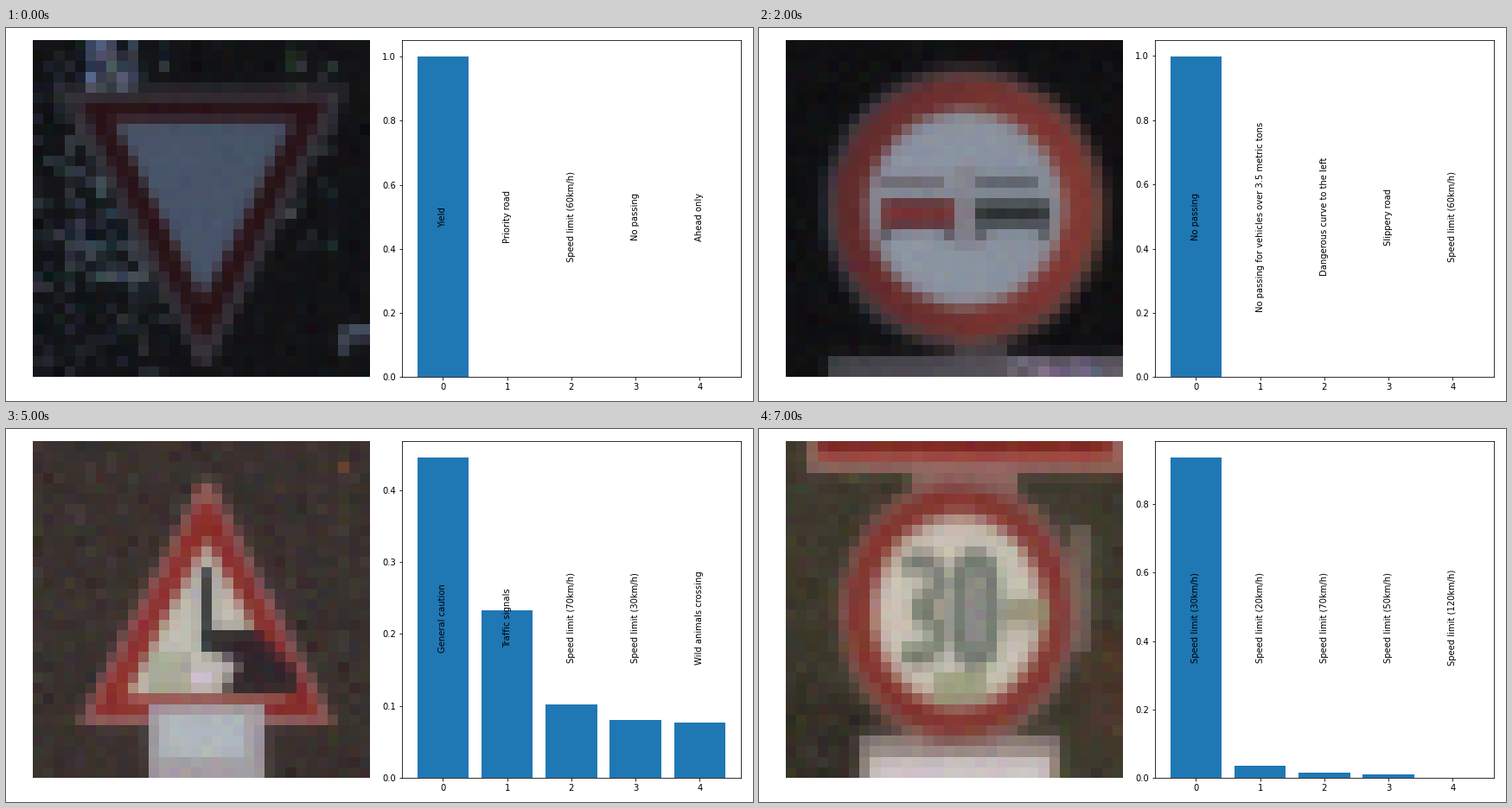
A matplotlib script for the animation above (8000 ms loop, 864x432 px).

```python
import numpy as np
import matplotlib.pyplot as plt
from matplotlib.animation import FuncAnimation
from matplotlib.colors import to_rgb
from matplotlib.path import Path

W, H, DPI = 864, 432, 72
CELLS, SUB = 32, 4
plt.rcParams.update({"font.family": "DejaVu Sans", "font.size": 10})

axis_pts = (np.arange(CELLS * SUB) + 0.5) / SUB
X, Y = np.meshgrid(axis_pts, axis_pts)
GRID = np.column_stack([X.ravel(), Y.ravel()])


def rgb(color):
    return 255 * np.array(to_rgb(color))


def oval_mask(cx, cy, rx, ry):
    return ((X - cx) / rx) ** 2 + ((Y - cy) / ry) ** 2 < 1


def poly_mask(pts):
    return Path(pts).contains_points(GRID).reshape(X.shape)


class Photo:
    """A 32 x 32 picture, painted in cell units, then averaged and softened."""

    def __init__(self, seed, bg, grain=6):
        self.rng = np.random.default_rng(seed)
        self.px = np.zeros(X.shape + (3,))
        self.fill(True, bg)
        self.speckle(0, 0, CELLS, CELLS, bg, 0.6, grain)

    def fill(self, mask, color, to=None):
        """Fill a mask; with `to`, fade the colour from left to right."""
        tone = rgb(color)
        if to:
            tone = tone + (X / CELLS)[..., None] * (rgb(to) - tone)
        mask = np.broadcast_to(mask, X.shape)
        self.px = np.where(mask[..., None], tone, self.px)

    def rect(self, x, y, w, h, color, to=None):
        self.fill((X > x) & (X < x + w) & (Y > y) & (Y < y + h), color, to)

    def poly(self, pts, color, to=None):
        self.fill(poly_mask(pts), color, to)

    def ring(self, cx, cy, rx, ry, width, color, right_only=False):
        hole = oval_mask(cx, cy, rx - width, ry - width)
        mask = oval_mask(cx, cy, rx, ry) & ~hole
        if right_only:
            mask &= X > cx - 0.5
        self.fill(mask, color)

    def speckle(self, x, y, w, h, color, density=0.5, spread=20):
        """Tint random cells with a random variation of the colour."""
        for r in range(y, y + h):
            for c in range(x, x + w):
                if self.rng.random() < density:
                    shift = self.rng.normal(0, spread) + self.rng.normal(0, spread / 3, 3)
                    tone = np.clip(rgb(color) + shift, 0, 255)
                    cell = np.s_[r * SUB:(r + 1) * SUB, c * SUB:(c + 1) * SUB]
                    self.px[cell] += self.rng.uniform(0.3, 1) * (tone - self.px[cell])

    def disc_sign(self, cx, cy, rx, ry, layers):
        """Concentric ovals; each layer is (scale, left colour, right colour)."""
        for k, left, right in layers:
            self.fill(oval_mask(cx, cy, k * rx, k * ry), left, right)

    def triangle_sign(self, cx, apex, base, half, layers):
        """Nested triangles, scaled about the centre of the inscribed circle."""
        height = base - apex
        leg = np.hypot(height, half)
        cy = base - half * height / (leg + half)
        for k, left, right in layers:
            foot, top = cy + k * (base - cy), cy + k * (apex - cy)
            self.poly([(cx - 0.5 * k, top), (cx + 0.5 * k, top),
                       (cx + k * half, foot), (cx - k * half, foot)], left, right)

    def finish(self, noise=2, soft=0.1):
        cells = self.px.reshape(CELLS, SUB, CELLS, SUB, 3).mean(axis=(1, 3))
        for axis in (0, 1):
            pad = [(1, 1) if a == axis else (0, 0) for a in range(3)]
            p = np.moveaxis(np.pad(cells, pad, mode="edge"), axis, 0)
            mixed = soft * (p[:-2] + p[2:]) + (1 - 2 * soft) * p[1:-1]
            cells = np.moveaxis(mixed, 0, axis)
        cells = cells + self.rng.normal(0, noise, cells.shape)
        return np.clip(cells, 0, 255).astype(np.uint8)


def yield_sign():
    p = Photo(3, "#121315", 3)
    p.speckle(0, 0, 13, 32, "#20262e", 0.5, 12)
    p.speckle(3, 6, 8, 18, "#424e5c", 0.6, 20)
    p.speckle(5, 0, 5, 5, "#64708a", 0.9, 24)
    p.speckle(24, 0, 5, 20, "#262c30", 0.4, 16)
    p.speckle(29, 27, 3, 3, "#5c667c", 0.7, 10)
    p.triangle_sign(16.2, 31, 4.5, 13.8, [
        (1, "#36343c", "#38343c"), (0.86, "#281216", "#281216"),
        (0.64, "#483e48", "#403844"), (0.59, "#4a576b", "#465266")])
    return p.finish(1.5, 0.05)


def no_passing():
    p = Photo(5, "#101012", 2)
    p.disc_sign(17, 16, 13.7, 13.7, [
        (1, "#1e2836", "#3e2a26"), (0.95, "#463e48", "#6c4a42"),
        (0.89, "#582628", "#883a34"), (0.69, "#76626a", "#96827e"),
        (0.65, "#8e96a8", "#88909a")])
    for x, roof, dark, bright in ((9, "#6a646a", "#603236", "#7a3230"),
                                  (18, "#565c64", "#4c5256", "#262a2c")):
        p.rect(x, 13, 6, 1, roof)
        p.rect(x, 15, 7, 3, dark)
        p.rect(x, 16, 7, 1, bright)
        for wheel in (x, x + 6):
            p.rect(wheel, 18, 1, 1, "#54565a")
    p.rect(16, 12, 2, 8, "#84848e")
    p.rect(4, 30, 28, 2, "#404246", "#605c64")
    p.rect(16, 29, 5, 1, "#443f44")
    p.speckle(21, 30, 9, 2, "#847a92", 0.8, 28)
    return p.finish()


def end_no_passing():
    p = Photo(7, "#21160e", 1)
    p.rect(0, 14, 32, 18, "#141213")
    p.speckle(0, 16, 32, 16, "#181412", 0.6, 3)
    p.rect(9, 0, 8, 2, "#0f0e0e")
    p.poly([(20, 0), (25, 0), (28, 8), (26, 10)], "#0f0d0e")
    p.disc_sign(16.1, 16.2, 13.1, 13.2, [
        (1, "#121216", "#171415"), (0.92, "#272b34", "#292d37")])
    p.rect(8, 11, 8, 9, "#1b1d20")
    p.rect(18, 17, 8, 3, "#1c1f24")
    for wheel in (18, 24):
        p.rect(wheel, 20, 1, 1, "#1b1d22")
    band = poly_mask([(22, 6.5), (25.8, 10), (10.6, 25.8), (6.5, 22.5)])
    p.fill(band, "#1a1c24")
    p.fill(band & ((np.floor(X) + np.floor(Y)) % 2 == 0), "#10121c")
    p.rect(16, 29, 1, 3, "#343229")
    return p.finish(1.2, 0.05)


def caution():
    p = Photo(11, "#3a322f", 6)
    p.rect(29, 2, 1, 1, "#7a4632")
    p.triangle_sign(16.5, 3.8, 27, 12.3, [
        (1, "#966060", "#966060"), (0.88, "#922e2a", "#842626"),
        (0.65, "#a0786e", "#a0786e"), (0.59, "#ccc6ba", "#b4b4ac")])
    p.rect(16, 12, 1, 8, "#2a3034")
    p.poly([(17, 18), (21, 18), (25, 22), (25, 24), (18, 24), (19.5, 21), (17, 20)],
           "#24282e", "#36242a")
    p.rect(11, 20, 4, 4, "#a8ac9a")
    p.rect(15, 22, 2, 1, "#d0beda")
    p.rect(11, 25, 11, 7, "#a49ea6")
    p.rect(12, 26, 8, 4, "#b0b8be")
    return p.finish(3, 0.08)


def children():
    p = Photo(13, "#484a49", 7)
    p.speckle(2, 0, 11, 9, "#705c3e", 0.9, 18)
    p.rect(4, 9, 2, 14, "#1e1e21")
    p.speckle(9, 1, 5, 3, "#7e4a46", 0.5, 12)
    p.rect(15, 0, 3, 3, "#d0d0de")
    p.rect(18, 4, 5, 10, "#707476")
    p.poly([(11, 6), (18, 6), (27, 24), (12, 32), (6, 32), (6, 13), (8, 10)], "#f6f2f8")
    p.rect(12, 26, 6, 6, "#fafbfc")
    p.rect(11, 27, 1, 5, "#7a7a7e")
    p.rect(16, 28, 2, 4, "#c4c8ce")
    p.rect(18, 26, 11, 6, "#5a5e62", "#70767a")
    p.rect(4, 22, 2, 6, "#9c986a")
    p.triangle_sign(16.7, 5.6, 26.6, 11.6, [
        (1, "#c89aa2", "#d8a0ac"), (0.9, "#b45450", "#c04c54"),
        (0.68, "#d0a8ac", "#d8a0c0"), (0.62, "#f8f8fc", "#f6f2fc")])
    p.rect(9, 24, 9, 1, "#84726c")
    p.rect(12, 5, 7, 1, "#805c5c")
    p.speckle(12, 16, 10, 6, "#8ab0e2", 0.75, 28)
    p.rect(29, 0, 1, 32, "#b8c2c4")
    p.rect(30, 0, 1, 32, "#e4f4f6")
    p.rect(31, 0, 1, 32, "#ffffff")
    return p.finish(4, 0.1)


def speed_thirty():
    p = Photo(17, "#3e392d", 7)
    p.speckle(0, 24, 9, 8, "#2a2621", 0.8, 4)
    p.speckle(28, 18, 4, 11, "#52362a", 0.8, 6)
    p.rect(2, 0, 30, 3, "#8e7066", "#986a64")
    p.rect(3, 0, 28, 2, "#a44842")
    p.rect(3, 0, 28, 1, "#7a2620")
    p.rect(12, 3, 10, 2, "#8e6862")
    p.rect(27, 8, 2, 12, "#706258")
    p.rect(7, 28, 19, 4, "#948680")
    p.rect(8, 30, 17, 2, "#cec4c6")
    p.disc_sign(16.4, 16.2, 11.4, 12.8, [
        (1, "#825850", "#886060"), (0.91, "#80302a", "#84342e"),
        (0.74, "#a07068", "#a07068"), (0.68, "#d0c6ba", "#c4c0b2")])
    for cy in (13.3, 18.5):
        p.ring(12.6, cy, 2.6, 2.9, 1.5, "#6c7266", right_only=True)
    p.rect(11, 11, 2, 1.5, "#70706a")
    p.rect(11, 19.5, 2, 1.5, "#626c5e")
    p.rect(16, 11, 4, 10, "#908e8a")
    p.ring(18, 16, 2.4, 5.8, 1.2, "#626c62")
    p.rect(21, 15, 4, 2.5, "#949276")
    p.rect(14, 22, 5, 3, "#9a9e80")
    return p.finish(3, 0.14)


def speed_fifty():
    p = Photo(19, "#202226", 5)
    p.disc_sign(16.2, 16, 12.6, 12.8, [
        (1, "#4a383c", "#4a383c"), (0.94, "#68282a", "#742e2c"),
        (0.71, "#80828a", "#80828a")])
    ink = "#2e3034"
    p.rect(10, 11, 5, 1.5, ink)
    p.rect(10, 11, 1.5, 4.5, ink)
    p.ring(11.5, 17.8, 3.3, 3.3, 1.5, ink, right_only=True)
    p.ring(19.7, 16, 3, 5.2, 1.5, ink)
    return p.finish()


def crossroads():
    p = Photo(23, "#323434", 6)
    p.triangle_sign(16.5, 3.2, 27.8, 13, [
        (1, "#704a4c", "#704a4c"), (0.89, "#7e2e2e", "#7e2e2e"),
        (0.6, "#929496", "#929496")])
    p.rect(15.7, 13, 1.7, 10, "#2a2a2e")
    p.rect(13.6, 18, 5.8, 1.4, "#323236")
    return p.finish(3)


def limit(*speeds):
    return [f"Speed limit ({s}km/h)" for s in speeds]


HEAVY = "vehicles over 3.5 metric tons"
# picture, leading probabilities, class names, extra room for tick labels
SCENES = [
    (yield_sign, [1],
     ["Yield", "Priority road", *limit(60), "No passing", "Ahead only"], 0),
    (speed_fifty, [1], limit(50, 30, 80, 60, 70), 0),
    (no_passing, [0.998, 0.002],
     ["No passing", "No passing for " + HEAVY, "Dangerous curve to the left",
      "Slippery road", *limit(60)], 0),
    (crossroads, [0.33, 0.24, 0.12, 0.09, 0.05],
     ["Right-of-way at the next intersection", "Pedestrians", "Double curve",
      "Beware of ice/snow", "General caution"], 3.2),
    (end_no_passing, [0.930, 0.0335, 0.0235, 0.003, 0.002],
     ["End of no passing by " + HEAVY, "End of no passing",
      "End of speed limit (80km/h)", "No passing for " + HEAVY, "Priority road"], 0.8),
    (caution, [0.445, 0.233, 0.102, 0.0807, 0.0771],
     ["General caution", "Traffic signals", *limit(70, 30), "Wild animals crossing"], 0),
    (children, [0.860, 0.040, 0.040, 0.024, 0.015],
     ["Children crossing", "Road narrows on the right", "Beware of ice/snow",
      "Slippery road", "Dangerous curve to the right"], 0),
    (speed_thirty, [0.936, 0.0363, 0.016, 0.011],
     limit(30, 20, 70, 50, 120), 0),
]
PHOTOS = [scene[0]() for scene in SCENES]

fig = plt.figure(figsize=(W / DPI, H / DPI), dpi=DPI, facecolor="white")
photo_ax = fig.add_axes([0, 0, 1, 1])
bar_ax = fig.add_axes([0.5, 0, 0.5, 1])


def place(ax, x, y, w, h):
    ax.set_position([x / W, y / H, w / W, h / H])


def draw(i):
    _, probs, names, room = SCENES[i]
    top = probs[0]
    width = 391.8 - room
    size = min(390, width)

    photo_ax.clear()
    place(photo_ax, 30.1 + (width - size) / 2, 28 + (390 - size) / 2, size, size)
    photo_ax.imshow(PHOTOS[i], interpolation="nearest", aspect="auto")
    photo_ax.axis("off")

    bar_ax.clear()
    place(bar_ax, 458 + room, 27.6, width, 390)
    bar_ax.bar(range(len(probs)), probs, color="#1f77b4")
    bar_ax.set_xlim(-0.64, 4.64)
    bar_ax.set_ylim(0, top * 1.05)
    bar_ax.set_xticks(range(5))
    for k, name in enumerate(names):
        bar_ax.text(k, top / 2, name, rotation=90, ha="center", va="center")
    return []


anim = FuncAnimation(fig, draw, frames=len(SCENES), interval=1000,
                     repeat=True, repeat_delay=0, blit=False)
plt.show()
```
